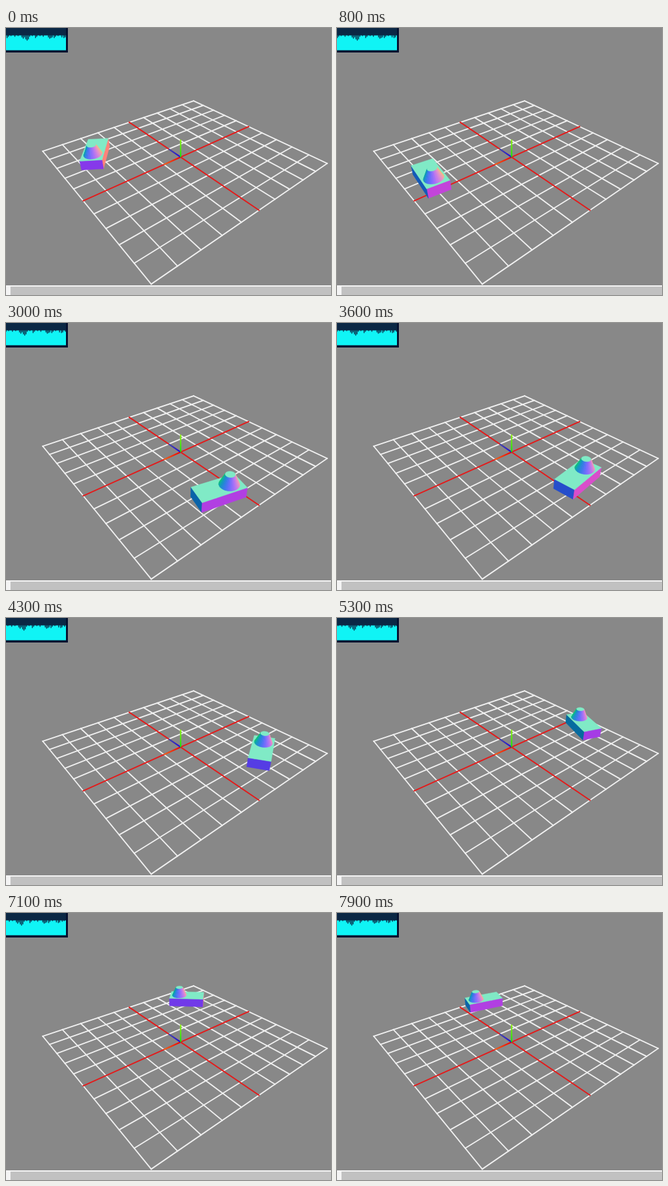
An HTML page with a canvas for the animation above (8 s loop, 504x414 px).

```html
<!DOCTYPE html>
<html lang="en">
<head>
<meta charset="utf-8">
<title>Car on a grid</title>
<style>
  html, body { margin: 0; width: 100%; height: 100%; overflow: hidden; background: #888; }
  canvas { display: block; }
</style>
</head>
<body>
<canvas id="stage" width="504" height="414"></canvas>
<script>
const ctx = document.getElementById('stage').getContext('2d');
const LOOP = 8000, STEP = 100;
const RAD = Math.PI / 180;

// Camera: orbit angles and distance, used for shading and culling.
const yaw = 142.5 * RAD, pitch = 33.4 * RAD, distance = 15.25;
const toCamera = [Math.cos(pitch) * Math.sin(yaw), Math.sin(pitch), Math.cos(pitch) * Math.cos(yaw)];
const right = [Math.cos(yaw), 0, -Math.sin(yaw)];
const up = [-Math.sin(pitch) * Math.sin(yaw), Math.cos(pitch), -Math.sin(pitch) * Math.cos(yaw)];
const eye = toCamera.map(v => v * distance);

const dot = (a, b) => a[0] * b[0] + a[1] * b[1] + a[2] * b[2];

function project([x, y, z]) {
  const w = 1 - 0.03556 * x - 0.0361 * y + 0.04164 * z;
  return [
    (270.8 - 34.46 * x - 9.78 * y - 7.96 * z) / w,
    (200.2 + 4.02 * x - 33.33 * y - 4.7 * z) / w
  ];
}

function line(a, b, color, width) {
  ctx.strokeStyle = color;
  ctx.lineWidth = width;
  ctx.beginPath();
  ctx.moveTo(...project(a));
  ctx.lineTo(...project(b));
  ctx.stroke();
}

// Colour follows the view-space normal.
function normalColor(n) {
  const channel = axis => Math.round(127.5 * (1 + dot(n, axis)));
  return `rgb(${channel(right)},${channel(up)},${channel(toCamera)})`;
}

function face(points, n) {
  const p = points[0];
  if (dot(n, [eye[0] - p[0], eye[1] - p[1], eye[2] - p[2]]) <= 0) return;
  ctx.fillStyle = ctx.strokeStyle = normalColor(n);
  ctx.lineWidth = 0.5;
  ctx.beginPath();
  points.forEach(q => ctx.lineTo(...project(q)));
  ctx.closePath();
  ctx.fill();
  ctx.stroke();
}

function drawGrid() {
  ctx.lineCap = 'square';
  for (let i = -5; i <= 5; i++) {
    if (!i) continue;
    line([i, 0, -5], [i, 0, 5], '#f0f0f0', 1.9);
    line([-5, 0, i], [5, 0, i], '#f0f0f0', 1.9);
  }
  line([0, 0, -5], [0, 0, 5], '#e31b1b', 2);
  line([-5, 0, 0], [5, 0, 0], '#e31b1b', 2);
}

function drawAxes() {
  ctx.lineCap = 'butt';
  const axes = [
    [[1, 0, 0], '#f00000', '#e86a20'],
    [[0, 0, 1], '#1010f0', '#3a4fb0'],
    [[0, 1, 0], '#10e800', '#90f010']
  ];
  for (const [tip, from, to] of axes) {
    const gradient = ctx.createLinearGradient(...project([0, 0, 0]), ...project(tip));
    gradient.addColorStop(0, from);
    gradient.addColorStop(1, to);
    line([0, 0, 0], tip, gradient, 2);
  }
}

function drawCar(time) {
  const a = (34.8 - 0.0367 * time) * RAD;
  const center = [-0.16 + 4.08 * Math.cos(a), 0.33 + 4.08 * Math.sin(a)];
  const ahead = [Math.sin(a), -Math.cos(a)];
  const side = [Math.cos(a), Math.sin(a)];
  const turn = (f, y, s) => [f * ahead[0] + s * side[0], y, f * ahead[1] + s * side[1]];
  const place = (f, y, s) => {
    const v = turn(f, y, s);
    return [v[0] + center[0], y, v[2] + center[1]];
  };

  // Body: 2 long, 1 wide, half a unit high.
  const L = 1, W = 0.5, H = 0.5;
  for (const k of [-1, 1]) {
    face([place(k * L, 0, -W), place(k * L, 0, W), place(k * L, H, W), place(k * L, H, -W)], turn(k, 0, 0));
    face([place(-L, 0, k * W), place(L, 0, k * W), place(L, H, k * W), place(-L, H, k * W)], turn(0, 0, k));
  }
  face([place(-L, H, -W), place(L, H, -W), place(L, H, W), place(-L, H, W)], [0, 1, 0]);

  // Turret: a truncated cone on the front half.
  const N = 48, low = 0.42, high = 0.2, offset = 0.46, top = 1;
  const slope = (low - high) / (top - H);
  const len = Math.hypot(1, slope);
  const rim = (i, r, y) => {
    const b = i / N * 2 * Math.PI;
    return place(offset + r * Math.cos(b), y, r * Math.sin(b));
  };
  const cap = [];
  for (let i = 0; i < N; i++) {
    const b = (i + 0.5) / N * 2 * Math.PI;
    face([rim(i, low, H), rim(i + 1, low, H), rim(i + 1, high, top), rim(i, high, top)],
      turn(Math.cos(b) / len, slope / len, Math.sin(b) / len));
    cap.push(rim(i, high, top));
  }
  face(cap, [0, 1, 0]);
}

// Dips in the frame-rate graph: position, depth.
const dips = [
  [1, 4], [3, 2], [7, 1], [13, 2], [18, 1], [24, 3], [26, 5], [28, 3], [30, 6], [32, 8], [34, 6],
  [36, 2], [40, 1], [45, 4], [47, 2], [52, 1], [57, 2], [65, 3], [67, 5], [69, 4], [71, 3],
  [74, 4], [76, 2], [80, 1], [86, 3], [89, 4], [91, 3], [95, 2], [98, 1]
];

function drawMeter(time) {
  const updates = Math.max(0, Math.floor((time - 570) / 1030) + 1);
  ctx.fillStyle = '#07112f';
  ctx.fillRect(0, 0, 96, 38);
  ctx.fillStyle = '#0b2845';
  ctx.fillRect(0, 0, 93, 12);
  ctx.fillStyle = '#10f4f5';
  ctx.fillRect(0, 11.5, 93, 23);
  ctx.fillStyle = '#0b2845';
  ctx.save();
  ctx.beginPath();
  ctx.rect(0, 0, 93, 35);
  ctx.clip();
  for (const [x, depth] of dips) ctx.fillRect(x - updates * 1.22, 11, 1.4, depth + 0.5);
  ctx.restore();
}

function drawFooter() {
  ctx.fillStyle = '#f4f4f4';
  ctx.fillRect(0, 399, 504, 15);
  ctx.fillStyle = '#c1c1c1';
  ctx.fillRect(7, 401, 497, 13);
}

function draw(time) {
  ctx.fillStyle = '#888';
  ctx.fillRect(0, 0, 504, 414);
  drawGrid();
  drawAxes();
  drawCar(time);
  drawMeter(time);
  drawFooter();
}

const start = performance.now();
function tick() {
  const time = (performance.now() - start) % LOOP;
  draw(Math.floor(time / STEP) * STEP);
  requestAnimationFrame(tick);
}
tick();
</script>
</body>
</html>
```
